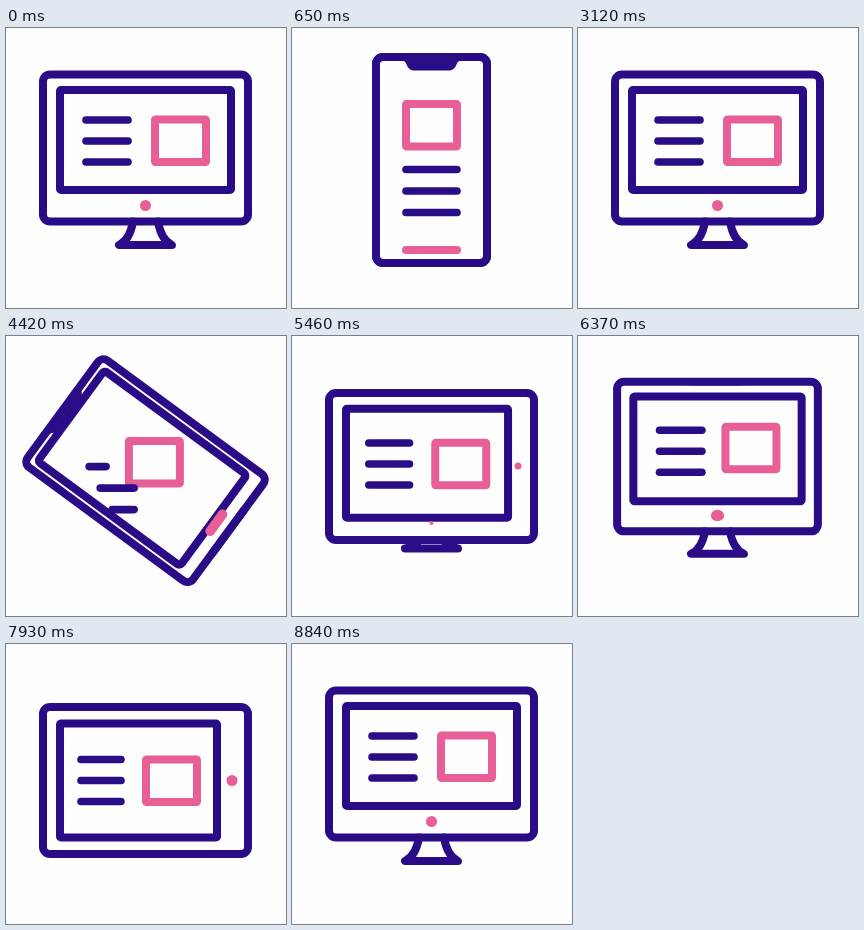
An HTML page with a canvas that plays this animation: 280x280 px, repeating every 8970 ms.

```html
<!DOCTYPE html>
<html lang="en">
<head>
<meta charset="utf-8">
<title>Responsive devices</title>
<style>
  html, body { margin: 0; width: 100%; height: 100%; overflow: hidden; background: #fefefe; }
  canvas { display: block; width: 100vw; height: 100vh; }
</style>
</head>
<body>
<canvas id="stage"></canvas>
<script>
const SIZE = 280, LOOP = 8970, TICK = 130, SLOT = 1040, MOVE = 580;
const NAVY = '#2b0c87', PINK = '#e85f98', WEIGHT = 8;

// Each slot is one move; some begin slightly before their slot.
const LEAD = [0, 50, 50, 0, 50, 0, 0, 0, 50];

const canvas = document.getElementById('stage');
const ctx = canvas.getContext('2d');

// Device parts are relative to the centre; page content uses stage positions.
// Boxes: left, top, right, bottom. Bar: y, half length, weight. Lines: x0, x1, y.
const desk = {
  centre: [139.5, 120], turn: 0,
  frame: [-102.5, -73.5, 102.5, 73.5], screen: [-85.5, -58, 85.5, 42],
  notch: 0, bar: [57.5, 0, 11], side: 0, base: 97,
  box: [149, 91.5], lines: [[80, 122, 92], [80, 122, 113], [80, 122, 134]]
};
const phone = {
  centre: [139.5, 132], turn: 0,
  frame: [-55.5, -103, 55.5, 103], screen: [-55.5, -103, 55.5, 103],
  notch: 1, bar: [90, 25.5, 8], side: 0, base: 103,
  box: [114, 76], lines: [[114, 165, 141.5], [114, 165, 163], [114, 165, 184.5]]
};
const tablet = {
  centre: [139.5, 136.5], turn: 0,
  frame: [-102.5, -73.5, 102.5, 73.5], screen: [-85.5, -57.5, 71.5, 56.5],
  notch: 0, bar: [56, 0, 0], side: 11, base: 73.5,
  box: [140, 115.5], lines: [[75, 115, 115.5], [75, 115, 136.5], [75, 115, 157.5]]
};
// The tablet seen as an upright device turned on its side.
const turned = {
  ...tablet, turn: -Math.PI / 2,
  frame: [-73.5, -102.5, 73.5, 102.5], screen: [-57, -85.5, 57, 71.5],
  bar: [86.5, 0, 11], side: 0, base: 102.5
};
// Where the page content passes at 60 % of the turn.
const VIA = 0.6;
const via = {
  box: [123, 105],
  lines: [[83, 100, 130.5], [94, 128, 152], [106, 128, 173.5]]
};

const moves = [[desk, phone], [phone, turned, via], [tablet, desk]];

const ease = x => x < 0.5 ? 4 * x ** 3 : 1 - 4 * (1 - x) ** 3;
const clamp = x => Math.min(1, Math.max(0, x));

function mix(a, b, p, mid) {
  if (Array.isArray(a)) return a.map((v, i) => mix(v, b[i], p, mid && mid[i]));
  const line = a + (b - a) * p;
  if (mid === undefined) return line;
  const bend = (mid - a - (b - a) * VIA) / (VIA * (1 - VIA));
  return line + bend * p * (1 - p);
}

function poseAt(t) {
  const slot = Math.floor(t / SLOT);
  const p = ease(clamp((t - slot * SLOT + LEAD[slot]) / MOVE));
  const [from, to, mid = {}] = moves[slot % 3];
  const pose = {};
  for (const key in from) pose[key] = mix(from[key], to[key], p, mid[key]);
  return pose;
}

function stroke(color, weight) {
  ctx.strokeStyle = color;
  ctx.lineWidth = weight;
  ctx.stroke();
}

function line(x0, x1, y, color, weight) {
  if (weight < 0.05) return;
  ctx.beginPath();
  ctx.moveTo(x0, y);
  ctx.lineTo(Math.max(x1, x0 + 0.01), y);
  stroke(color, weight);
}

function rect([l, t, r, b], radius, color) {
  ctx.beginPath();
  ctx.roundRect(l, t, r - l, b - t, radius);
  stroke(color, WEIGHT);
}

function drawStand(top, base) {
  const y = f => top + (base - top) * f;
  ctx.beginPath();
  ctx.moveTo(-12.5, top);
  ctx.bezierCurveTo(-14.5, y(0.5), -18, y(0.83), -26.5, base);
  ctx.lineTo(26.5, base);
  ctx.bezierCurveTo(18, y(0.83), 14.5, y(0.5), 12.5, top);
  stroke(NAVY, WEIGHT);
}

function drawNotch(top, depth) {
  if (depth < 0.005) return;
  const y = top + WEIGHT / 2 - 0.5, h = 10 * depth;
  ctx.beginPath();
  ctx.moveTo(-31, y);
  ctx.quadraticCurveTo(-26, y, -25, y + h * 0.4);
  ctx.quadraticCurveTo(-23, y + h, -17, y + h);
  ctx.lineTo(17, y + h);
  ctx.quadraticCurveTo(23, y + h, 25, y + h * 0.4);
  ctx.quadraticCurveTo(26, y, 31, y);
  ctx.fillStyle = NAVY;
  ctx.fill();
}

function drawDevice(d) {
  ctx.save();
  ctx.translate(...d.centre);
  ctx.rotate(d.turn);
  drawStand(d.frame[3], d.base);
  rect(d.screen, d.notch > 0.99 ? 7 : 1 + 6 * d.notch, NAVY);
  rect(d.frame, 7, NAVY);
  drawNotch(d.frame[1], d.notch);
  const [y, half, weight] = d.bar;
  line(-half, half, y, PINK, weight);
  line(86.5, 86.5, -0.5, PINK, d.side);
  ctx.restore();
}

function drawPage({ box: [x, y], lines }) {
  rect([x, y, x + 51, y + 42.5], 0.5, PINK);
  for (const [x0, x1, ly] of lines) line(x0, x1, ly, NAVY, 7.6);
}

function draw(t) {
  const w = Math.round(innerWidth * devicePixelRatio);
  const h = Math.round(innerHeight * devicePixelRatio);
  if (canvas.width !== w || canvas.height !== h) {
    canvas.width = w;
    canvas.height = h;
  }
  ctx.setTransform(w / SIZE, 0, 0, h / SIZE, 0, 0);
  ctx.fillStyle = '#fefefe';
  ctx.fillRect(0, 0, SIZE, SIZE);
  ctx.lineCap = ctx.lineJoin = 'round';
  const pose = poseAt(t);
  drawDevice(pose);
  drawPage(pose);
}

const start = performance.now();

function loop() {
  const t = Math.max(0, performance.now() - start) % LOOP;
  draw(Math.floor(t / TICK) * TICK);
  requestAnimationFrame(loop);
}
loop();
</script>
</body>
</html>
```
